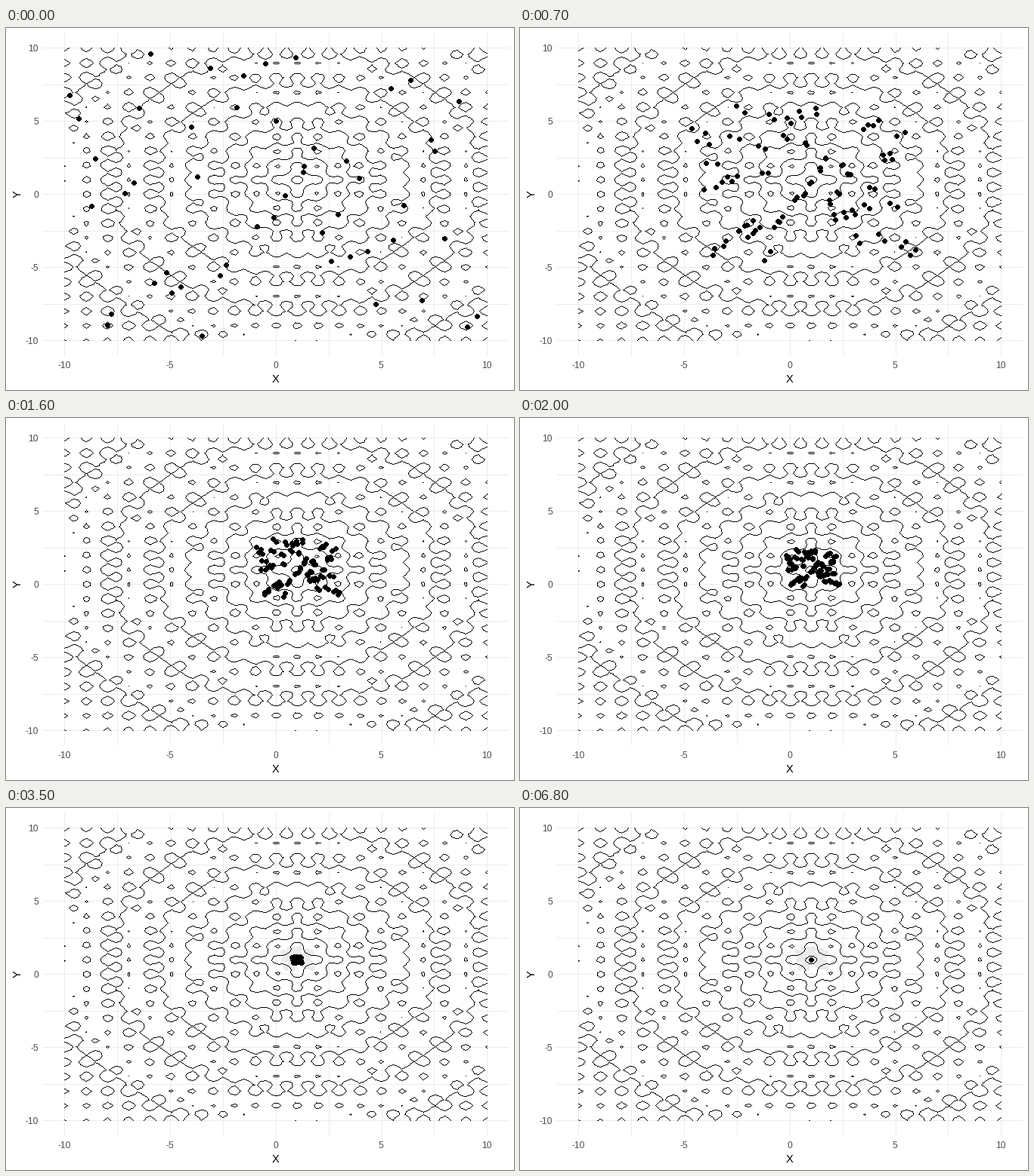
Write a matplotlib script that moves like this. It is 672 px wide and 480 px high and loops after 10 s.

```python
import numpy as np
import matplotlib.pyplot as plt
from matplotlib.animation import FuncAnimation

W, H, DPI = 672, 480, 96
FRAMES, STEP_MS = 100, 100
GREY, BLACK = 235, 0
PARTICLES = 50
STAIN = 25                              # the swarm's outline at this step stays grey

ORIGIN = np.array([357.33, 220.62])     # place of (0, 0) on the stage
SCALE = np.array([27.94, -19.39])       # pixels per unit

plt.rcParams["font.family"] = "Liberation Sans"
fig = plt.figure(figsize=(W / DPI, H / DPI), dpi=DPI, facecolor="white")
ax = fig.add_axes([0, 0, 1, 1])
ax.axis("off")


def to_pixel(points):
    return np.floor(ORIGIN + SCALE * points).astype(int)


def label(x, y, text, size, color, **kw):
    fig.text(x / W, 1 - y / H, text, fontsize=size, color=color, va="baseline", **kw)


def ackley(x, y):
    """Ackley function with its minimum at (1, 1)."""
    bowl = -20 * np.exp(-0.2 * np.sqrt(0.5 * ((x - 1) ** 2 + (y - 1) ** 2)))
    waves = -np.exp(0.5 * (np.cos(2 * np.pi * x) + np.cos(2 * np.pi * y)))
    return bowl + waves + np.e + 20


def contour_mask():
    """Contour lines as crisp one-pixel strokes."""
    axis = np.linspace(-10, 10, 100)
    gx, gy = np.meshgrid(axis, axis)
    lines = ax.contour(gx, gy, ackley(gx, gy), levels=np.arange(2, 21, 2))
    mask = np.zeros((H, W), bool)
    for level in lines.allsegs:
        for line in level:
            nodes = to_pixel(line)
            for a, b in zip(nodes[:-1], nodes[1:]):
                n = max(abs(b - a).max(), 1)
                x, y = np.rint(np.linspace(a, b, n + 1)).astype(int).T
                mask[y, x] = True
    lines.remove()
    return mask


def grid():
    page = np.full((H, W, 3), 255, np.uint8)
    left, top = to_pixel(np.array([-11, 11]))
    right, bottom = to_pixel(np.array([11, -11]))
    for v in np.arange(-10, 10.1, 2.5):
        x, y = to_pixel(np.array([v, v]))
        page[top:bottom + 1, x] = GREY
        page[y, left:right + 1] = GREY
    return page


# Round dot, seven pixels wide
dy, dx = np.mgrid[-3:4, -3:4]
inside = dx ** 2 + dy ** 2 <= 10
DOT_X, DOT_Y = dx[inside], dy[inside]


def stamp(page, points, color):
    x, y = to_pixel(points).T
    page[y[:, None] + DOT_Y, x[:, None] + DOT_X] = color


# Evenly spread random start: one particle per row and column
rng = np.random.default_rng(12)
cells = np.column_stack([rng.permutation(PARTICLES) for _ in "xy"])
START = (cells + rng.random(cells.shape)) / PARTICLES * 19.6 - 9.8
START[0] = 1.3, 1.5                     # the first leader


def leader(t):
    """Best place found so far: drifts outward a little, then falls to (1, 1)."""
    growth = 1 + np.array([0.1, 0.06]) * t
    return 1 + (START[0] - 1) * growth * np.exp(-(t / 17) ** 2)


def swarm(t):
    return leader(t) + (START - START[0]) * np.exp(-0.09 * t ** 1.06)


def trail(i):
    """Swarm now and one step before."""
    return np.vstack([swarm(max(i - 1, 0)), swarm(i)])


contours = contour_mask()
base = grid()
base[contours] = BLACK
stained = base.copy()
stamp(stained, trail(STAIN), GREY)
stained[contours] = BLACK

image = ax.imshow(base, interpolation="nearest", aspect="auto")
ax.set(xlim=(-0.5, W - 0.5), ylim=(H - 0.5, -0.5))

for v in range(-10, 11, 5):
    px, py = ORIGIN + SCALE * v
    label(px - 0.7, 451, str(v), 9, "#4D4D4D", ha="center")
    label(43, py + 4.5, str(v), 9, "#4D4D4D", ha="right")
label(356.5, 469.5, "X", 11, "black", ha="center")
label(19.5, 220.5, "Y", 11, "black", ha="center", rotation=90, rotation_mode="anchor")


def draw(i):
    page = (stained if i > STAIN else base).copy()
    stamp(page, trail(i), BLACK)
    image.set_data(page)
    return image,


anim = FuncAnimation(fig, draw, frames=FRAMES, interval=STEP_MS, repeat=True,
                     repeat_delay=0, blit=False)
plt.show()
```
